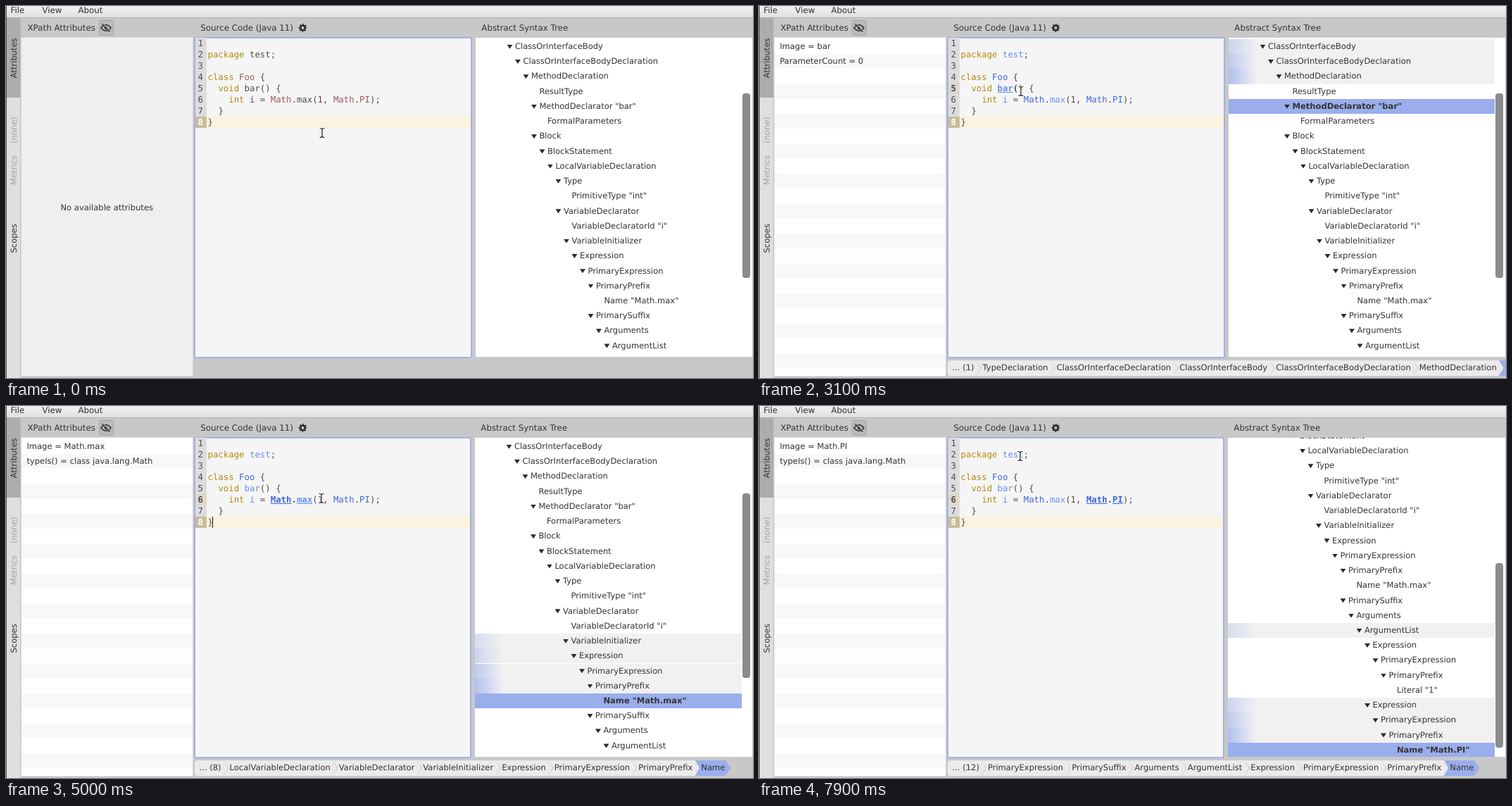
Animation, 1061 px wide and 528 px high, one loop 8000 ms. Source, as an HTML page:

```html
<!DOCTYPE html>
<html lang="en">
<head>
<meta charset="utf-8">
<title>Syntax tree designer</title>
<style>
html, body { margin: 0; width: 100%; height: 100%; overflow: hidden; }
body { position: relative; background: #c8c8c8; color: #333;
  font: 11.55px/21.24px "DejaVu Sans", sans-serif; text-rendering: geometricPrecision; }
div, svg { position: absolute; white-space: pre; }
svg { left: 0; top: 0; width: 1061px; height: 528px; }
.head { font-size: 11.85px; }
#menu { left: 0; top: 0; width: 1061px; height: 17px; box-sizing: border-box;
  background: linear-gradient(#f0f0f0, #e1e1e1); border-bottom: 1px solid #b4b4b4; }
#menu div { top: -4.4px; }
#attrs { left: 22px; top: 45px; width: 242.5px; height: 480px; overflow: hidden; background: #efefef;
  box-shadow: 0 0 0 1px #d8d8d8; }
#attrs.on { background: repeating-linear-gradient(#fff 0 21.24px, #f8f8f8 21.24px 42.48px) 0 1.9px; }
#attrs div { left: 7.4px; }
#editor { left: 267px; top: 44px; height: 456px; box-sizing: border-box; background: #f5f5f5;
  border: 2px solid #a3b0e6; border-radius: 2px; overflow: hidden; }
#code { left: 0; top: 0; font: 12.35px/16px "DejaVu Sans Mono", monospace; color: #4d4d4d; }
#code .num { left: 269px; width: 16px; height: 16px; text-indent: 3.6px; background: #dddddd; }
#code .num.hot { background: #dfd9cd; font-weight: bold; }
#code .num.now { background: #c8bc9a; color: #fff; font-weight: bold; }
#code .line { left: 286.5px; }
#band { left: 285px; top: 157px; height: 16px; background: #fcf3de; }
.k { color: #b58a0e; }
.c { color: #3f68d6; }
.n { color: #668eea; }
.plain .c { color: #a0575a; }
.plain .n { color: inherit; }
.bold { font-weight: bold; }
.bold.c, .bold.n { text-decoration: underline; text-decoration-thickness: 1px; text-underline-offset: 1px; }
#tree { top: 45px; height: 453px; background: #fff; overflow: hidden; }
#tree .row { left: 0; height: 21.24px; }
#tree .up { background: #f1f1f1; }
#tree .sel { background: #9aaeed; font-weight: bold; }
#tree .fade { left: 0; top: 0; width: 40px; height: 100%; }
#tree .tri { width: 8px; height: 6px; top: 7.8px; background: #2b2b2b; clip-path: polygon(0 0, 100% 0, 50% 100%); }
#bar { left: 1046px; width: 11px; height: 262px; border-radius: 4px; background: #8b8b8b; }
#crumbs { left: 268px; top: 503px; width: 793px; height: 21.5px; overflow: hidden; display: flex; }
#crumbs span { position: relative; flex: none; padding: 0 3.5px 0 8.5px; background: #ebebeb; }
#crumbs span:first-child { padding-left: 6.5px; border-radius: 4px 0 0 4px; }
#crumbs span:last-child { padding-right: 1px; }
#crumbs span::before, #crumbs span::after { content: ""; position: absolute; z-index: 1; left: 100%; top: 0;
  width: 7px; height: 100%; background: #bdbdbd; clip-path: polygon(0 0, 100% 50%, 0 100%); }
#crumbs span::after { width: 6px; background: #ebebeb; }
#crumbs .sel, #crumbs .sel::after, #crumbs .sel::before { background: #9aaeed; }
#caret { left: 293px; top: 156.5px; width: 1.2px; height: 16.5px; background: #111; }
</style>
</head>
<body>
<div id="menu" class="head"><div style="left:6.500px">File</div><div style="left:51.300px">View</div><div style="left:102.500px">About</div></div>
<svg>
  <path d="M1 17H20.500V528H1z" fill="#dfdfdf"/>
  <path d="M1 17H20.500V130H1z" fill="#adadad"/>
  <path d="M0 0H1V528H0z" fill="#555"/>
  <path d="M20.500 17H21.500V528H20.500z" fill="#b8b8b8"/>
  <g id="tabs" fill="#333"></g>
  <rect x="132.500" y="20.500" width="20" height="21" rx="3" fill="#bababa" stroke="#a4a4a4"/>
  <g transform="translate(142 31)" fill="none" stroke="#2e2e2e" stroke-width="1.500">
    <path d="M-7 0Q0 -8.500 7 0Q0 8.500 -7 0z"/>
    <circle r="2.200" fill="#2e2e2e" stroke="none"/>
    <path d="M-4.500 -6L6.500 5" stroke="#bababa"/>
    <path d="M-5.500 -5.500L5.500 5.500"/>
  </g>
  <g transform="translate(421.500 31)" fill="none" stroke="#2e2e2e">
    <circle r="3.300" stroke-width="2.600"/>
    <circle r="4.900" stroke-width="2" stroke-dasharray="1.924" stroke-dashoffset=".96"/>
  </g>
</svg>
<div class="head" style="left:30.500px;top:20.500px">XPath Attributes</div>
<div class="head" style="left:276.300px;top:20.500px">Source Code (Java 11)</div>
<div class="head" id="title" style="top:20.500px">Abstract Syntax Tree</div>
<div id="attrs"></div>
<div id="editor"></div>
<div id="band"></div>
<div id="code"></div>
<div id="caret"></div>
<div id="tree"></div>
<div id="bar"></div>
<div id="crumbs"></div>
<svg>
  <g id="mouse" fill="none" stroke-linecap="round">
    <path d="M-3 -6.500Q-.500 -6.500 0 -5.300Q.500 -6.500 3 -6.500M0 -5.300V5.300M-3 6.500Q-.500 6.500 0 5.300Q.500 6.500 3 6.500" stroke="#fff" stroke-width="3"/>
    <path d="M-3 -6.500Q-.500 -6.500 0 -5.300Q.500 -6.500 3 -6.500M0 -5.300V5.300M-3 6.500Q-.500 6.500 0 5.300Q.500 6.500 3 6.500" stroke="#111" stroke-width="1.200"/>
  </g>
</svg>
<script>
const LOOP = 8000, STEP = 100, ROW = 21.24, TOP = 1.9, INDENT = 11.5;
const $ = id => document.getElementById(id);

// depth, then node label
const nodes = `0 ClassOrInterfaceBody
1 ClassOrInterfaceBodyDeclaration
2 MethodDeclaration
3 ResultType
3 MethodDeclarator "bar"
4 FormalParameters
3 Block
4 BlockStatement
5 LocalVariableDeclaration
6 Type
7 PrimitiveType "int"
6 VariableDeclarator
7 VariableDeclaratorId "i"
7 VariableInitializer
8 Expression
9 PrimaryExpression
10 PrimaryPrefix
11 Name "Math.max"
10 PrimarySuffix
11 Arguments
12 ArgumentList
13 Expression
14 PrimaryExpression
15 PrimaryPrefix
16 Literal "1"
13 Expression
14 PrimaryExpression
15 PrimaryPrefix
16 Name "Math.PI"`.split("\n").map(s => {
  const i = s.indexOf(" ");
  return { depth: +s.slice(0, i), name: s.slice(i + 1) };
});

// tokens split by "|"; prefix k: keyword, c: type or constant, n: name
const code = [
  "", "k:package| |n:test|;", "", "k:class| |c:Foo| {",
  "  |k:void| |n:bar|()| {",
  "    |k:int| |n:i| = |c:Math|.|n:max|(|1|, |c:Math|.|c:PI|);",
  "  |}", "}"
];

const methodPath = "... (1)|TypeDeclaration|ClassOrInterfaceDeclaration|ClassOrInterfaceBody|ClassOrInterfaceBodyDeclaration|";
const argPath = "... (12)|PrimaryExpression|PrimarySuffix|Arguments|ArgumentList|Expression|PrimaryExpression|PrimaryPrefix|";
const mathType = "typeIs() = class java.lang.Math";

// focus: [line, first column, end column]
const views = [
  { t: 0, dx: 0, focus: [], plain: true },
  { t: 1200, dx: 0, focus: [] },
  { t: 3100, dx: 0, sel: 4, focus: [[5, 7, 12]], attrs: "Image = bar|ParameterCount = 0",
    crumbs: methodPath + "MethodDeclaration|*MethodDeclarator" },
  { t: 3500, dx: 7, sel: 2, wide: true, metrics: true, focus: [[5, 2, 14], [6, 4, 33], [7, 2, 3]],
    attrs: "Abstract = false|Default = false|Final = false|Image = null|InterfaceMember = false|Kind = METHOD|" +
      "MethodName = bar|Modifiers = 0|Name = bar|Native = false|PackagePrivate = true|Private = false|" +
      "Protected = false|Public = false|Static = false|Strictfp = false|Synchronized = false|" +
      "SyntacticallyAbstract = false|SyntacticallyPublic = false|Transient = false|Void = true|Volatile = false",
    crumbs: methodPath + "*MethodDeclaration|MethodDeclarator" },
  { t: 3900, dx: -1, sel: 17, focus: [[6, 12, 20]], attrs: "Image = Math.max|" + mathType,
    crumbs: "... (8)|LocalVariableDeclaration|VariableDeclarator|VariableInitializer|Expression|PrimaryExpression|PrimaryPrefix|*Name" },
  { t: 5100, dx: -1, sel: 24, scroll: 163.7, focus: [[6, 21, 22]],
    attrs: "CharLiteral = false|DoubleLiteral = false|EscapedStringLiteral = 1|FloatLiteral = false|Image = 1|" +
      "IntLiteral = true|LongLiteral = false|SingleCharacterStringLiteral = false|StringLiteral = false|" +
      "ValueAsDouble = 1.0|ValueAsFloat = 1.0|ValueAsInt = 1|ValueAsLong = 1|typeIs() = int",
    crumbs: argPath + "*Literal" },
  { t: 6500, dx: -1, sel: 28, scroll: 163.7, focus: [[6, 24, 31]], attrs: "Image = Math.PI|" + mathType,
    crumbs: argPath + "*Name" }
];

// time, x, y
const path = [
  [0, 449, 180], [1700, 449, 180], [2400, 356, 121], [3000, 356, 121], [3100, 372, 121],
  [3300, 383, 127], [3400, 383, 127], [3600, 386, 130], [3800, 386, 130], [4100, 398, 131],
  [4200, 398, 131], [4500, 430, 131], [4600, 430, 131], [4900, 448, 131], [5500, 448, 131],
  [5600, 475, 130], [5700, 462, 130], [5800, 462, 130], [5900, 480, 130], [6000, 470, 130],
  [7200, 470, 130], [7300, 478, 128], [7900, 371, 71], [8000, 371, 71]
];
const blinks = [100, 600, 1100, 1600, 2100, 3100, 3600, 4100, 4500, 5600, 6700, 7300];

const div = (cls, style, text = "") => `<div class="${cls}" style="${style}">${text}</div>`;

function codeHtml(focus) {
  return code.map((src, i) => {
    const line = i + 1, top = 45 + 16 * i;
    let col = 0;
    const html = src.split("|").map(part => {
      const [, kind = "", text] = part.match(/^(?:([kcn]):)?(.*)$/);
      const from = col;
      col += text.length;
      const bold = focus.some(f => f[0] === line && from >= f[1] && col <= f[2]);
      return `<span class="${kind}${bold ? " bold" : ""}">${text}</span>`;
    }).join("");
    const mark = line === 8 ? " now" : focus.some(f => f[0] === line) ? " hot" : "";
    return div("num" + mark, `top:${top}px`, line) + div("line", `top:${top}px`, html);
  }).join("");
}

// up to four ancestors of the selected row, nearest first
function ancestors(sel) {
  const list = [];
  if (sel === undefined) return list;
  let depth = nodes[sel].depth;
  for (let i = sel - 1; i >= 0 && list.length < 4; i--) {
    if (nodes[i].depth < depth) { list.push(i); depth = nodes[i].depth; }
  }
  return list;
}

function treeHtml(v) {
  const ups = ancestors(v.sel), width = v.wide ? 385.5 : 377.5 - Math.min(v.dx, 0);
  return nodes.map((n, i) => {
    const x = 55.9 + n.depth * INDENT, up = ups.indexOf(i);
    const open = nodes[i + 1] && nodes[i + 1].depth > n.depth;
    let inner = "";
    if (up >= 0) {
      const alpha = 0.74 - 0.15 * up;
      inner += div("fade", `background:linear-gradient(90deg,rgba(154,174,237,${alpha}),rgba(154,174,237,0))`);
    }
    if (open) inner += div("tri", `left:${x - 11.4}px`);
    inner += div("", `left:${x}px`, n.name);
    const cls = "row" + (i === v.sel ? " sel" : up >= 0 ? " up" : "");
    return div(cls, `top:${TOP + i * ROW - (v.scroll || 0)}px;width:${width}px`, inner);
  }).join("");
}

function tabsHtml(on) {
  const tab = (y, text, fill = "#333") =>
    `<text transform="translate(15.300 ${y}) rotate(-90)" fill="${fill}">${text}</text>`;
  const tone = on ? "#333" : "#a3a3a3";
  return tab(102.5, "Attributes") + tab(on ? 232.5 : 254, "Metrics", tone) +
    tab(on ? 175 : 195, on ? "(5)" : "(none)", tone) + tab(on ? 329 : 350.5, "Scopes");
}

function show(v) {
  const right = 662 + v.dx;
  $("title").style.left = 675.3 + v.dx + "px";
  $("editor").style.width = right - 267 + "px";
  $("band").style.width = right - 287 + "px";
  $("code").className = v.plain ? "plain" : "";
  $("code").innerHTML = codeHtml(v.focus);
  $("tree").style.left = 667 + v.dx + "px";
  $("tree").style.width = 393 - v.dx + "px";
  $("tree").innerHTML = treeHtml(v);
  $("bar").style.display = v.wide ? "none" : "";
  $("bar").style.top = (v.scroll ? 223 : 124) + "px";
  $("tabs").innerHTML = tabsHtml(v.metrics);
  $("attrs").className = v.attrs ? "on" : "";
  $("attrs").innerHTML = v.attrs
    ? v.attrs.split("|").map((s, i) => div("", `top:${TOP + i * ROW}px`, s)).join("")
    : div("", "left:0;width:100%;top:230.800px;text-align:center", "No available attributes");
  $("crumbs").innerHTML = v.crumbs
    ? v.crumbs.split("|").map(s => s[0] === "*" ? `<span class="sel">${s.slice(1)}</span>` : `<span>${s}</span>`).join("")
    : "";
}

function mouseAt(t) {
  const i = path.findIndex(p => p[0] > t), a = path[i - 1], b = path[i];
  const k = (t - a[0]) / (b[0] - a[0]);
  return [a[1] + (b[1] - a[1]) * k, a[2] + (b[2] - a[2]) * k].map(Math.round);
}

let current;
function frame() {
  const t = Math.floor(performance.now() % LOOP / STEP) * STEP;
  const view = views.filter(v => v.t <= t).pop();
  if (view !== current) show(current = view);
  $("caret").style.visibility = blinks.filter(b => b <= t).length % 2 ? "visible" : "hidden";
  $("mouse").setAttribute("transform", `translate(${mouseAt(t)})`);
  requestAnimationFrame(frame);
}
frame();
</script>
</body>
</html>
```
